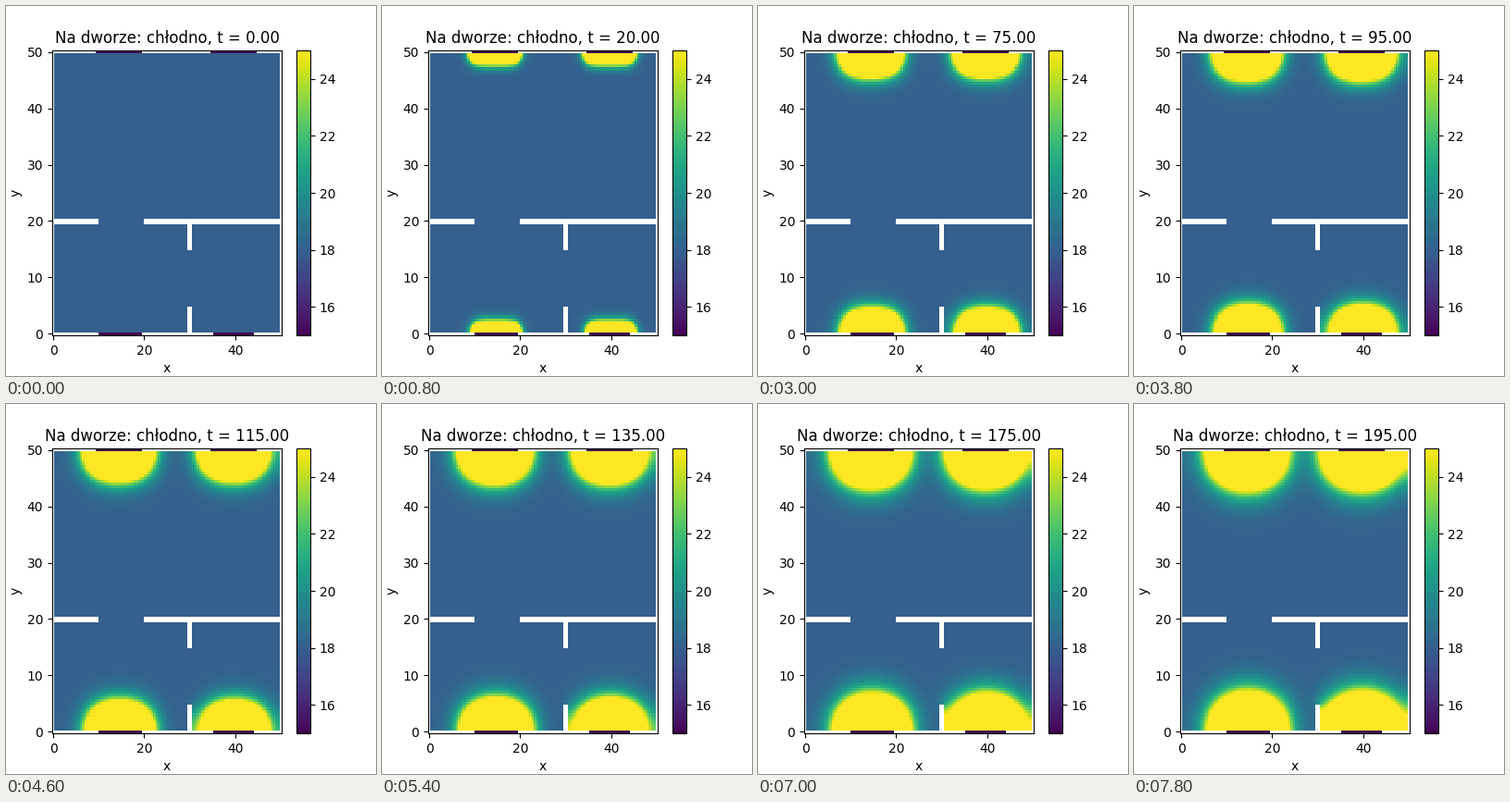
Animation of 400 by 400 pixels, one loop 8000 ms. Source, as a matplotlib script:

```python
import numpy as np
import matplotlib.pyplot as plt
from matplotlib.animation import FuncAnimation

N = 100
FRAMES = 40
T_STEP = 5.0          # simulated time per frame
DT = 0.5
D = 0.055             # diffusivity
START, HOT, COLD = 18.0, 25.0, 15.0

grid = np.linspace(0, 50, N)
h = grid[1] - grid[0]

# Floor plan: outer walls, a partition with a doorway, a split lower room
wall = np.zeros((N, N), bool)
wall[[0, -1], :] = True
wall[:, [0, -1]] = True
wall[39:41, :20] = True
wall[39:41, 40:] = True
wall[30:39, 59:61] = True
wall[:10, 59:61] = True

window = np.zeros((N, N), bool)
window[0, 20:39] = window[0, 70:88] = True
window[-1, 19:39] = window[-1, 69:89] = True

heater = np.zeros((N, N))
heater[1:3, 20:39] = heater[1:3, 70:89] = 1
heater[-3:-1, 19:39] = heater[-3:-1, 69:89] = 1

air = ~wall
open_x = air[:, 1:] & air[:, :-1]
open_y = air[1:, :] & air[:-1, :]


def step(heat):
    """One explicit diffusion step with insulated walls."""
    k = D * DT / h**2
    fx = k * np.diff(heat, axis=1) * open_x
    fy = k * np.diff(heat, axis=0) * open_y
    out = heat + DT * heater
    out[:, :-1] += fx
    out[:, 1:] -= fx
    out[:-1, :] += fy
    out[1:, :] -= fy
    return out


def temperature(heat, t):
    """Scale the heat so that the hot front advances as sqrt(t)."""
    temp = np.full((N, N), START)
    if t > 0:
        front = 0.5255 * np.sqrt(t)
        level = np.interp(front, grid, heat[:, 29])
        temp += (HOT - START) * heat / level
    temp[wall] = np.nan
    temp[window] = COLD
    return temp


def simulate():
    heat = np.zeros((N, N))
    fields = []
    for i in range(FRAMES):
        fields.append(temperature(heat, i * T_STEP))
        for _ in range(int(T_STEP / DT)):
            heat = step(heat)
    return fields


fields = simulate()

fig, ax = plt.subplots(figsize=(4, 4), dpi=100)
mesh = ax.pcolormesh(grid, grid, np.ma.masked_invalid(fields[0]),
                     shading="nearest", cmap="viridis", vmin=COLD, vmax=HOT)
fig.colorbar(mesh, ax=ax)
ax.set_xlabel("x")
ax.set_ylabel("y")
title = ax.set_title("")


def draw(i):
    mesh.set_array(np.ma.masked_invalid(fields[i]))
    title.set_text(f"Na dworze: chłodno, t = {i * T_STEP:.2f}")
    return mesh, title


anim = FuncAnimation(fig, draw, frames=FRAMES, interval=200,
                     repeat=True, repeat_delay=0, blit=False)
plt.show()
```
